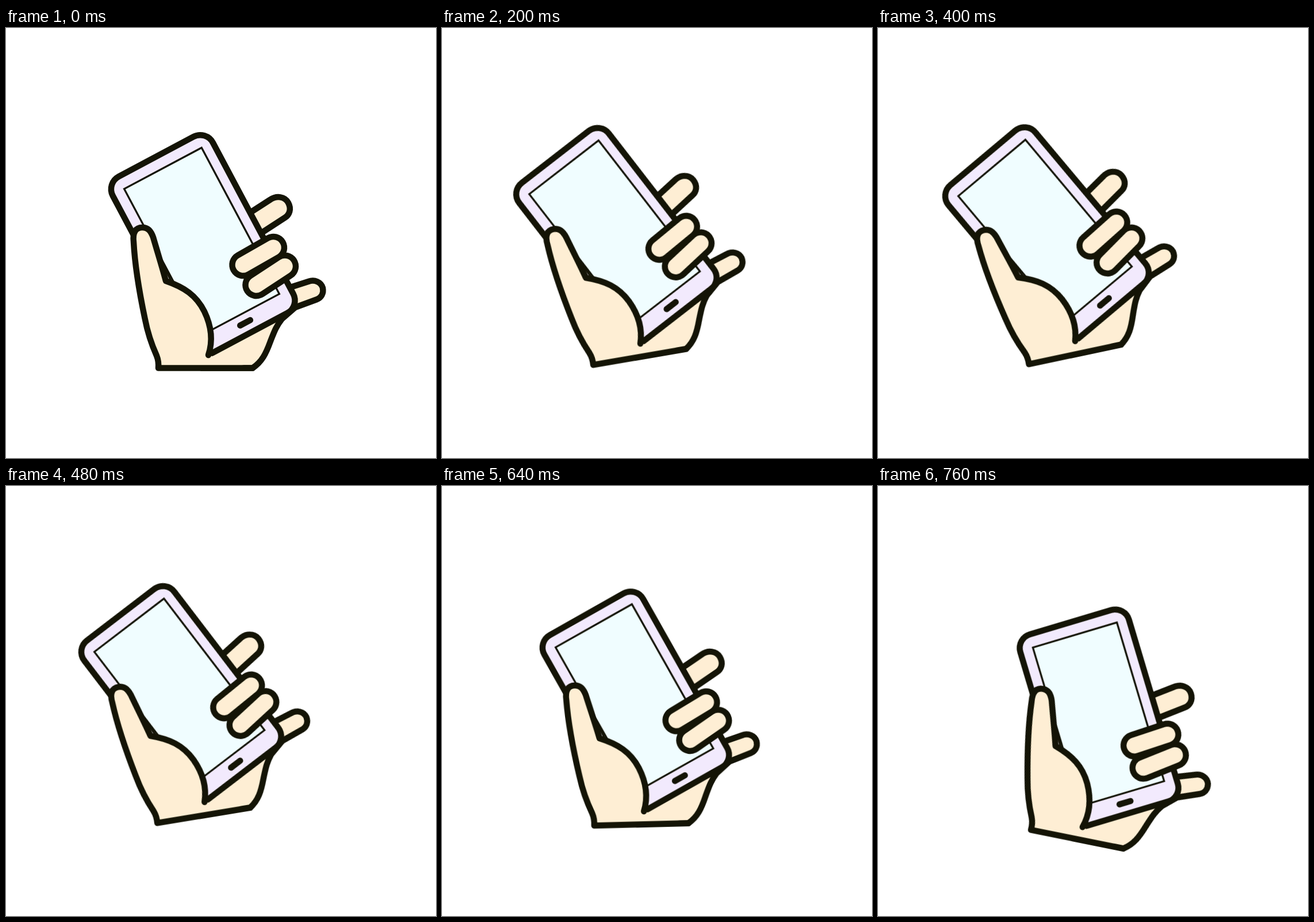
Write an HTML page without scripts that moves like this. It is 748 px wide and 748 px high and loops after 0.8 s.

```html
<!DOCTYPE html>
<html lang="en">
<head>
<meta charset="utf-8">
<title>Hand waving a phone</title>
<style>
  html, body { margin: 0; width: 100%; height: 100%; overflow: hidden; background: #fff; }
  svg { display: block; width: 100%; height: 100%; }

  .outlined { stroke: #141406; stroke-width: 10.5; stroke-linecap: round; stroke-linejoin: round; }
  .skin { fill: #feeed4; }
  .case { fill: #f2eafd; }
  .screen { fill: #f0fdff; stroke: #141406; stroke-width: 3.2; }
  .crease { fill: none; stroke: #141406; stroke-width: 3.5; }
  .finger { stroke-linecap: round; }
  .finger.edge { stroke: #141406; stroke-width: 48.5; }
  .finger.flesh { stroke: #feeed4; stroke-width: 27.5; }

  /* Each pose is held for 40 ms; the swing snaps back at the loop point. */
  .swing { transform-origin: 232px 600px; animation: swing 800ms step-end infinite; }
  @keyframes swing {
    0% { transform: rotate(0deg); }
    5% { transform: rotate(-3.3deg); }
    10% { transform: rotate(-5.7deg); }
    15% { transform: rotate(-7.5deg); }
    20% { transform: rotate(-8.7deg); }
    25% { transform: rotate(-9.75deg); }
    30% { transform: rotate(-10.9deg); }
    35% { transform: rotate(-11.9deg); }
    40% { transform: rotate(-12.65deg); }
    45% { transform: rotate(-12.8deg); }
    50% { transform: rotate(-12deg); }
    55% { transform: rotate(-10.8deg); }
    60% { transform: rotate(-9.4deg); }
    65% { transform: rotate(-8deg); }
    70% { transform: rotate(-6.3deg); }
    75% { transform: rotate(-4.1deg); }
    80% { transform: rotate(-1.44deg); }
    85% { transform: rotate(2deg); }
    90% { transform: rotate(6.2deg); }
    95%, 100% { transform: rotate(11.4deg); }
  }
</style>
</head>
<body>
<svg viewBox="0 0 748 748">
  <g class="swing">
    <!-- index finger, little finger and back of the palm -->
    <path class="outlined skin" d="M428 319 L459 299 C471 291 485 293 491 304 C497 315 493 325 485 330 L445 356"/>
    <path class="outlined skin" d="M498 450 L526 441 C537 437 548 442 551 452 C553 462 548 469 541 472 L503 486
      L480 506 C469 520 466 530 460 545 C452 567 445 581 429 591.5 L340 591.5 V500"/>

    <g transform="translate(204 279) rotate(-28)">
      <rect class="outlined case" x="-22.2" y="-22" width="197.2" height="347.5" rx="25"/>
      <rect class="screen" x="1" y="1.5" width="152.5" height="288"/>
      <path class="outlined" d="M67.5 306 h20"/>
    </g>

    <!-- thumb and front of the palm -->
    <path class="crease" d="M271 405 L287 440"/>
    <path class="outlined skin" d="M352 569 C360 545 358 520 345 493 C331 465 310 451 278 440
      C272 417 265 395 256 364 C252 353 247 347 237 347 C226 347 220 355 222 372
      C224 410 231 455 241.5 505 C246.5 531 253 550 262 570 Q266 580 265 591.5 H429"/>

    <!-- middle and ring fingers -->
    <path class="finger edge" d="M412.5 412 L465 382 M435.5 447 L485 414.5"/>
    <path class="finger flesh" d="M412.5 412 L465 382 M435.5 447 L485 414.5"/>
  </g>
</svg>
</body>
</html>
```
